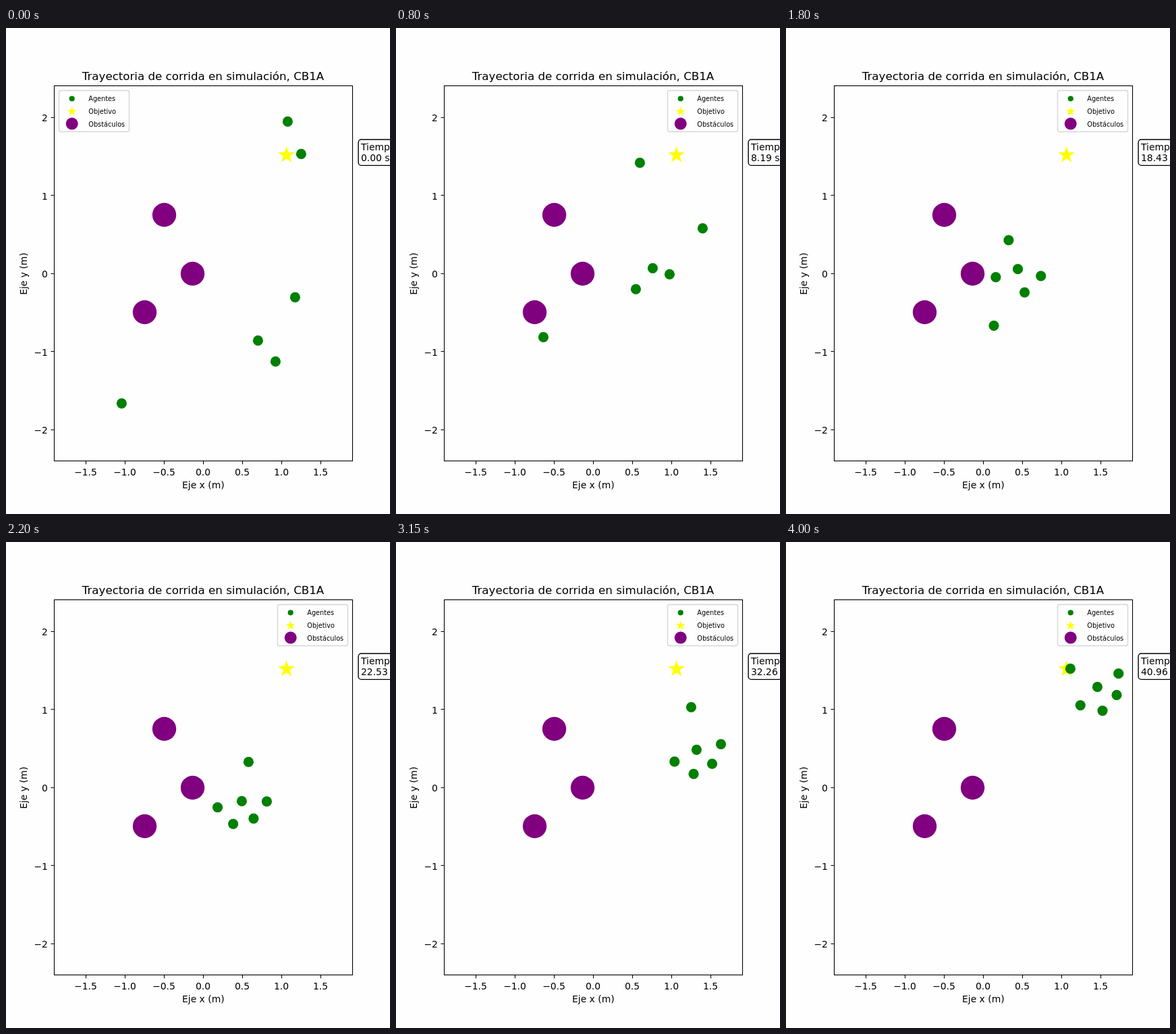
An HTML page with a canvas that plays this animation: 569 by 719 pixels, repeating every 4050 ms.

```html
<!DOCTYPE html>
<html lang="es">
<head>
<meta charset="utf-8">
<title>Trayectoria de corrida</title>
<style>
html, body { margin: 0; width: 100%; height: 100%; overflow: hidden; background: #fefefe; }
canvas { display: block; width: 569px; height: 719px; }
</style>
</head>
<body>
<canvas id="stage"></canvas>
<script>
const W = 569, H = 719, STEP = 50, STEPS = 81, DT = 0.512;
const LEGEND_SWITCH = 7;
const BG = '#fefefe', GREEN = '#008000', YELLOW = '#ffff00', PURPLE = '#800080';
const SMALL = 9.72, NORMAL = 13.89, LARGE = 16.67;
const canvas = document.getElementById('stage');
const ctx = canvas.getContext('2d');
const ratio = window.devicePixelRatio || 1;
canvas.width = Math.round(W * ratio);
canvas.height = Math.round(H * ratio);

// The swarm gathers until FORMED, then travels as a slowly turning ring.
const GATHER = [0, 16, 28], FORMED = [44, 53, 63, 80];
const TIMES = [...GATHER, ...FORMED];

const path = (...points) => points.map(([x, y], i) => ({ n: TIMES[i], x, y }));

const leader = path([417, 138], [361, 199], [320, 277], [359, 325], [404, 292], [437, 244], [421, 187]);
const centre = path([399, 493], [405, 364], [359, 328], [349, 383], [394, 357], [445, 307], [461, 214]);

function follower(slot, radius, ...gather) {
  const ring = FORMED.map((n, i) => {
    const c = centre[GATHER.length + i];
    const turn = -0.0028 * (n - 61) ** 3;
    const a = (55 * slot - 13 + turn) * Math.PI / 180;
    return [c.x + radius * Math.cos(a), c.y + radius * Math.sin(a)];
  });
  return path(...gather, ...ring);
}

const AGENTS = [
  leader,
  centre,
  follower(0, 37, [437, 186], [454, 296], [393, 332]),
  follower(1, 31, [373, 462], [355, 386], [354, 367]),
  follower(2, 36, [171, 555], [218, 457], [281, 457]),
  follower(3, 37, [428, 398], [380, 355], [331, 341])
];
const OBSTACLES = [[234.5, 276.5], [276.5, 363.5], [205.5, 420.5]];

function slope(p, i, k) {
  const sec = j => (p[j + 1][k] - p[j][k]) / (p[j + 1].n - p[j].n);
  if (i === 0) return sec(0);
  if (i === p.length - 1) return 0.3 * sec(i - 1);
  const h0 = p[i].n - p[i - 1].n, h1 = p[i + 1].n - p[i].n;
  return (sec(i - 1) * h1 + sec(i) * h0) / (h0 + h1);
}

// Cubic Hermite curve through the points; k is 'x' or 'y'.
function at(p, n, k) {
  let i = 0;
  while (i < p.length - 2 && n > p[i + 1].n) i++;
  const h = p[i + 1].n - p[i].n, s = (n - p[i].n) / h;
  const s2 = s * s, s3 = s2 * s, blend = 3 * s2 - 2 * s3;
  return p[i][k] * (1 - blend) + p[i + 1][k] * blend +
    h * (slope(p, i, k) * (s3 - 2 * s2 + s) + slope(p, i + 1, k) * (s3 - s2));
}

function text(str, x, y, size, align = 'left') {
  ctx.font = size + 'px "DejaVu Sans", sans-serif';
  ctx.textAlign = align;
  ctx.fillStyle = '#000';
  ctx.fillText(str, x, y);
}

function disc(x, y, r, color) {
  ctx.fillStyle = color;
  ctx.beginPath();
  ctx.arc(x, y, r, 0, Math.PI * 2);
  ctx.fill();
}

function star(x, y, r) {
  ctx.fillStyle = YELLOW;
  ctx.beginPath();
  for (let i = 0; i < 10; i++) {
    const a = i * Math.PI / 5, d = i % 2 ? r * 0.4 : r;
    ctx.lineTo(x + d * Math.sin(a), y - d * Math.cos(a));
  }
  ctx.fill();
}

function panel(x, y, w, h, r, fill, stroke) {
  ctx.beginPath();
  ctx.roundRect(x, y, w, h, r);
  ctx.fillStyle = fill;
  ctx.fill();
  ctx.strokeStyle = stroke;
  ctx.lineWidth = 1.39;
  ctx.stroke();
}

const signed = str => str.replace('-', '\u2212');

function axes() {
  ctx.strokeStyle = '#000';
  ctx.lineWidth = 1.1;
  ctx.strokeRect(71.5, 85.5, 442, 555);
  ctx.beginPath();
  for (let v = -1.5; v <= 1.5; v += 0.5) {
    const x = Math.floor(292.3 + 116.1 * v) + 0.5;
    ctx.moveTo(x, 641);
    ctx.lineTo(x, 645.5);
    text(signed(v.toFixed(1)), x - 0.5, 662, NORMAL, 'center');
  }
  for (let v = -2; v <= 2; v++) {
    const y = Math.floor(363.3 - 115.5 * v) + 0.5;
    ctx.moveTo(66.5, y);
    ctx.lineTo(71, y);
    text(signed(String(v)), 61.9, Math.round(369.45 - 115.5 * v), NORMAL, 'right');
  }
  ctx.stroke();
  text('Trayectoria de corrida en simulación, CB1A', 292, 77, LARGE, 'center');
  text('Eje x (m)', 292.3, 681, NORMAL, 'center');
  ctx.save();
  ctx.translate(31, 363.5);
  ctx.rotate(-Math.PI / 2);
  text('Eje y (m)', 0, 0, NORMAL, 'center');
  ctx.restore();
}

function legend(x) {
  panel(x + 0.5, 92.5, 104, 61, 2.8, 'rgba(254,254,254,0.8)', 'rgba(204,204,204,0.8)');
  disc(x + 19.7, 104.5, 4.1, GREEN);
  star(x + 19.7, 123.6, 7.1);
  disc(x + 19.7, 141.6, 9, PURPLE);
  ['Agentes', 'Objetivo', 'Obstáculos'].forEach((s, i) =>
    text(s, x + 44.3, Math.round(108.4 + 18.6 * i), SMALL));
}

function clock(n) {
  panel(522.1, 165, 70, 38.4, 4.4, BG, '#000');
  text('Tiempo:', 526, 181, NORMAL);
  text((n * DT).toFixed(2) + ' s', 526, 197, NORMAL);
}

function draw(n) {
  ctx.setTransform(ratio, 0, 0, ratio, 0, 0);
  ctx.fillStyle = BG;
  ctx.fillRect(0, 0, W, H);
  axes();
  OBSTACLES.forEach(([x, y]) => disc(x, y, 17.7, PURPLE));
  star(415.6, 188, 13);
  AGENTS.forEach(p => disc(at(p, n, 'x') + 0.4, at(p, n, 'y') + 0.4, 7.6, GREEN));
  legend(n < LEGEND_SWITCH ? 78 : 402);
  clock(n);
}

const start = performance.now();
function tick() {
  const t = Math.max(0, performance.now() - start);
  draw(Math.floor(t / STEP) % STEPS);
  requestAnimationFrame(tick);
}
tick();
</script>
</body>
</html>
```
